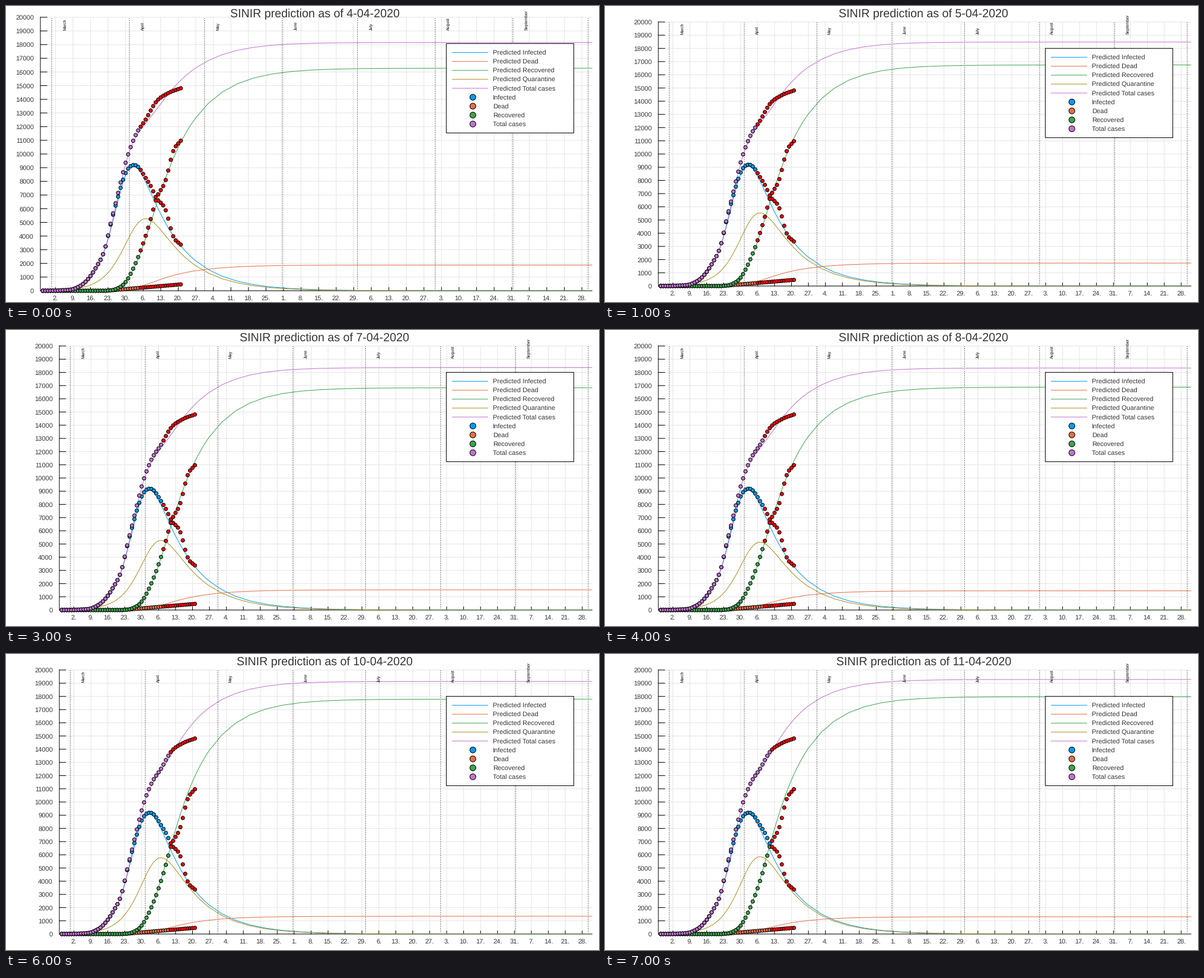
A matplotlib script that plays this animation: 1000x500 px, repeating every 8 s.

```python
import numpy as np
import matplotlib.pyplot as plt
from matplotlib.animation import FuncAnimation
from matplotlib.patches import Circle, Rectangle

plt.rcParams["font.family"] = "Liberation Sans"
plt.rcParams["text.hinting"] = "none"

PX = 0.72  # points per pixel at 100 dpi
INK, GRID = "#363636", "#e5e5e5"
BLUE, ORANGE, GREEN = "#009afa", "#e36f47", "#3ea44e"
GOLD, PURPLE, RED = "#ac8e18", "#c371d2", "#ff0000"
RUNS, RIGHT, LAST_DAY, Y_MAX = 8, 988, 220, 20000

# Day 0 is 25 February, so March starts on day 5
MONTHS, first = [], 5
for name, length in [("March", 31), ("April", 30), ("May", 31), ("June", 30),
                     ("July", 31), ("August", 31), ("September", 30), ("", 0)]:
    MONTHS.append((name, first))
    first += length


def logistic(x):
    return 1 / (1 + np.exp(-x))


def smooth(x, knots):
    """Cubic Hermite curve through (position, value) knots."""
    xs, ys = np.array(knots, float).T
    slope = np.gradient(ys, xs)
    i = np.clip(np.searchsorted(xs, x) - 1, 0, len(xs) - 2)
    h = xs[i + 1] - xs[i]
    t = (x - xs[i]) / h
    y = ((1 + 2 * t) * (1 - t) ** 2 * ys[i] + t * (1 - t) ** 2 * h * slope[i]
         + t * t * (3 - 2 * t) * ys[i + 1] + t * t * (t - 1) * h * slope[i + 1])
    return np.maximum(y, 0)


# Observed cases, one value per day
days = np.arange(57)
total = smooth(days, [(0, 2), (8, 29), (14, 182), (18, 655), (22, 1646), (26, 3244),
                      (28, 4900), (30, 6398), (35, 9974), (38, 11383), (42, 12519),
                      (46, 13776), (51, 14452), (56, 14810)])
recovered = smooth(days, [(0, 0), (26, 0), (30, 112), (34, 636), (38, 2022),
                          (44, 5240), (46, 6604), (50, 8098), (53, 10214),
                          (56, 10971)])
dead = 15.5 * np.maximum(days - 26, 0)
OBSERVED = [(total - recovered - dead, BLUE), (dead, ORANGE),
            (recovered, GREEN), (total, PURPLE)]

# The solver takes ever longer steps in the tail
CURVE_DAYS = np.concatenate([np.arange(0, 62, 0.5), np.geomspace(62, LAST_DAY, 17)])


def predict(run):
    """Predicted curves with their colours: a logistic onset times a slow decay."""
    key_runs = [0, 1, 4, 6, 7]
    final_recovered = np.interp(run, key_runs, [16275, 16745, 16880, 17790, 17975])
    final_dead = 1150 + 730 * np.exp(-0.22 * run)
    peak = np.interp(run, key_runs, [5270, 5540, 5140, 5780, 5860])
    growth = final_recovered / 16275 - 1

    d = CURVE_DAYS
    infected = 9850 * np.exp(-0.0685 * (d - 40)) * logistic(0.28 * (d - 33))
    quarantine = 1.622 * peak * np.exp(-0.07 * (d - 40)) * logistic(0.24 * (d - 38.3))
    remaining = (0.188 - 0.07 * growth) * np.exp(-0.073 * (d - 65.5))
    recovered = (final_recovered * np.exp(-remaining)
                 * logistic(0.2 * (d - 38.4 - 9 * growth)))
    dead = recovered * final_dead / final_recovered
    return [(infected, BLUE), (dead, ORANGE), (recovered, GREEN),
            (quarantine, GOLD), (infected + dead + recovered, PURPLE)]


fig = plt.figure(figsize=(10, 5), dpi=100, facecolor="white")
ax = fig.add_axes([0, 0, 1, 1])


def line(x, y, color, z, **style):
    ax.plot(x, y, color=color, lw=PX, zorder=z, snap=False, **style)


def dots(xs, ys, color, z, radius=3):
    for center in zip(xs, ys):
        ax.add_patch(Circle(center, radius, fc=color, ec="black", lw=PX, zorder=z))


def label(x, y, text, size=8, color=INK, **style):
    ax.text(x, y, text, fontsize=size, color=color, zorder=12,
            **{"va": "baseline", **style})


def draw_axes(left, top, bottom, px, py):
    for value in range(0, Y_MAX + 1, 1000):
        y = py(value)
        line([left, RIGHT], [y, y], GRID, 1)
        line([left, left + 0.012 * (RIGHT - left)], [y, y], "black", 2)
        label(left - 11, y + 4, str(value), ha="right")
    for day in range(6, LAST_DAY, 7):
        x = px(day)
        start = max(first for _, first in MONTHS if first <= day)
        line([x, x], [top, bottom], GRID, 1)
        line([x, x], [bottom, bottom - 0.012 * (bottom - top)], "black", 2)
        label(x, bottom + 15.7, f"{day - start + 1}.", ha="center")
    line([left, left], [top, bottom], "black", 2)
    line([left, RIGHT], [bottom, bottom], "black", 2)
    for name, first in MONTHS:
        x = px(first - 0.5)
        line([x, x], [bottom, top], "black", 3, ls=(0, (1, 2)))
        label(px(first + 4.5) + 1.7, py(19000) - 0.8, name, 5, "black",
              rotation=90, ha="center", va="bottom")


def draw_legend(top):
    ax.add_patch(Rectangle((742.5, top), 215, 151, fc="white", ec="black",
                           lw=PX, zorder=10, snap=False))
    entries = [("Infected", BLUE), ("Dead", ORANGE), ("Recovered", GREEN),
               ("Quarantine", GOLD), ("Total cases", PURPLE)]
    rows = [("Predicted " + name, color, True) for name, color in entries]
    rows += [(name, color, False) for name, color in entries if color != GOLD]
    for i, (name, color, is_line) in enumerate(rows, 1):
        y = top + 15.1 * i
        if is_line:
            line([752.5, 812.5], [y, y], color, 11)
        else:
            dots([787.3], [y], color, 11, 5)
        label(821, y + 4.4, name)


def draw(run):
    ax.clear()
    ax.set(xlim=(0, 1000), ylim=(500, 0))
    ax.axis("off")
    left, top, bottom = (58, 19, 481) if run == 0 else (90, 27, 473)

    def px(day):
        return left + day * (RIGHT - left) / LAST_DAY

    def py(value):
        return bottom - value * (bottom - top) / Y_MAX

    draw_axes(left, top, bottom, px, py)
    for curve, color in predict(run):
        line(px(CURVE_DAYS), py(curve), color, 4)

    known, future = days[1:40 + run], days[40 + run:]
    for values, color in OBSERVED:
        dots(px(known), py(values[known]), color, 5)
        dots(px(future), py(values[future]), RED, 6)

    draw_legend(top + 44.5)
    label((left + RIGHT) / 2 - 1.7, 19, f"SINIR prediction as of {4 + run}-04-2020",
          14.1, ha="center")
    return []


anim = FuncAnimation(fig, draw, frames=RUNS, init_func=lambda: [],
                     interval=1000, repeat=True, repeat_delay=0)
plt.show()
```
